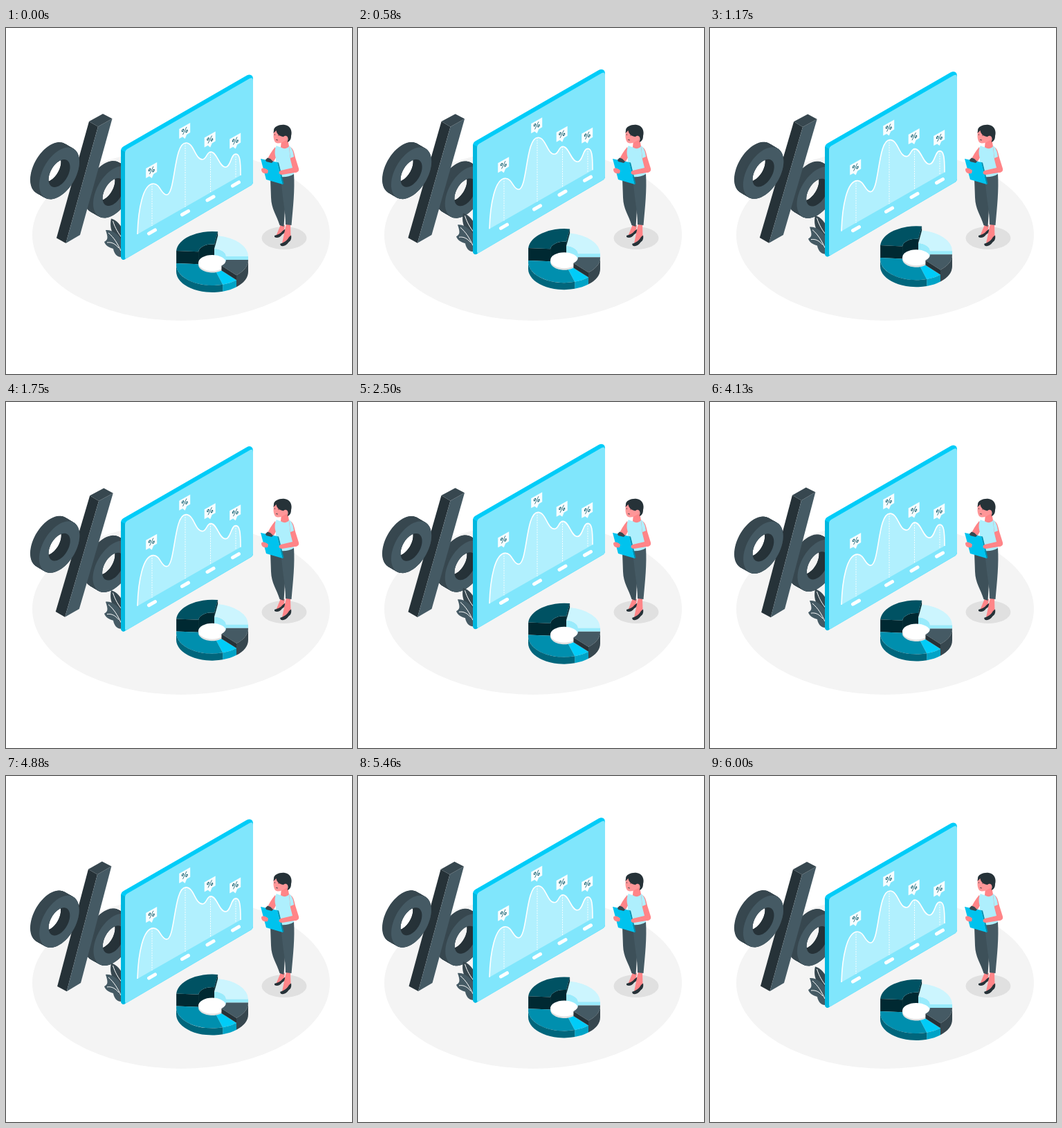
These frames come from a looping animation (500 px wide and 500 px high, 6040 ms). An HTML page:

```html
<!DOCTYPE html>
<html lang="en">
<head>
<meta charset="utf-8">
<title>Percent dashboard</title>
<style>
  html, body { margin: 0; width: 100%; height: 100%; overflow: hidden; background: #fff; }
  svg { display: block; width: 100vw; height: 100vh; }
  text { font: 600 11px Inter, "Open Sans", sans-serif; fill: #005263; text-anchor: middle; }
</style>
</head>
<body>
<svg viewBox="0 0 500 500">
  <ellipse cx="253" cy="299" rx="215" ry="124" fill="#f4f4f4"/>
  <ellipse cx="402" cy="303.5" rx="32.5" ry="16.5" fill="#e0e0e0"/>

  <g id="percent">
    <g id="ringRight"></g>
    <path d="M120 135L133 142.5L86.5 311L73 303.500Z" fill="#263238"/>
    <path d="M133 142.500L153.500 131L107 299L86.500 311Z" fill="#455a64"/>
    <path d="M120 135L140 124L153.500 131L133 142.500Z" fill="#37474f"/>
    <g id="ringLeft"></g>
  </g>

  <g id="panel">
    <g id="plant">
      <path d="M170 314C153 303 149 288 152 275.500C160 277 167 286 170 295Z" fill="#37474f"/>
      <path d="M168 331C160 332 156 325 155 319C149 317 144 315 142 309C147 306 148 304 144 292C153 291 164 298 170 312Z" fill="#455a64"/>
      <path d="M154.500 279C158 290 162 296 168 304M148 296C156 303 161 311 166 322M146 310C153 309 158 312 163 318" fill="none" stroke="#fff" stroke-width="1"/>
    </g>
    <path d="M166 178Q166 173 170 171L348 68.500Q353 66 356 69.500Q357 71 357 75V222Q357 226 353 228L173 333.500Q169 336 167 333.500Q166 332 166 330Z" fill="#00ccf8"/>
    <path d="M166 176L172 179V334Q169 336 167 333.500Q166 332 166 330Z" fill="#00b8df"/>
    <path d="M172 181Q172 177 175 175L352 73Q357 70.500 357 76V222Q357 226 353 228L175 332.500Q172 334 172 331Z" fill="#80e6fc"/>
    <path id="area" fill="#fff" fill-opacity=".38"/>
    <path id="curve" fill="none" stroke="#fff" stroke-width="1.600"/>
    <g id="marks"></g>
  </g>

  <g id="pie"></g>

  <g id="woman">
    <path d="M397 284L403 285L401.500 293L394 299L390 301Z" fill="#ff8588"/>
    <path d="M388 300C392 299 397 297 400 293L403.500 290.500C404.500 294 402 297 399 298.500C396 303 391 304 388 302Z" fill="#263238"/>
    <path d="M405 283H411L411.500 302L403 309L399 311Z" fill="#ff8588"/>
    <path d="M396 312C401 310 406 308 409 302L412 299.500C413 305 411 308 408.500 309.500C405 315 400 316 397 314.500Z" fill="#263238"/>
    <path d="M382 217L400 214L405 245L403 262L401.500 287L395.500 285C391 270 383.500 262 383 245Z" fill="#3d5059"/>
    <path d="M396 214L416 210C417.500 235 415 257 412.500 285L404 284C404 265 400 250 398 225Z" fill="#455a64"/>
    <path d="M389 172C384 178 380 184 377 192L385 196L393 182Z" fill="#ff8588"/>
    <path d="M391 170C396 173 403 173 409 170C412 173 414 176 414.500 183C415 193 416 204 416 211C410 215 402 216 396 215C390 207 390 196 390 188C388 182 388 175 391 170Z" fill="#aeeffd"/>
    <path d="M398 162L407 160L409 171C406 175 400 175 397 172Z" fill="#ff8588"/>
    <path d="M387.500 148C386 153 386 161 389 165C393 168 399 166 403 163C408 162 409 158 407 155L401 147Z" fill="#ff9698"/>
    <path d="M387 148C387 142 396 139 403 140C411 141 414 149 412 156C412 161 410 164 406.500 165C408 161 408 157 405 156C402 155 401 158 400 157C394 156 391 152 390.500 148L386.500 152Z" fill="#263238"/>
    <path d="M388.500 153.500V155M394 154.500V156M390 161.500L393 162" stroke="#263238" stroke-width=".8"/>
    <path d="M368 189L392 194L400 226L376 219Z" fill="#00c3ee"/>
    <path d="M392 194L394 194.500L401.500 225L400 226Z" fill="#008fae"/>
    <path d="M375 190.500L378 187.500L382 189L386 193L384 195L376 193Z" fill="#37474f"/>
    <path d="M369 204C371 201 376 203 379 206L378 210C374 211 369 210 369 204Z" fill="#ff8588"/>
    <path d="M409 172C415 172 416 179 418 187L423 203C424 207 421 209 417 209L399 212C394 212 393 208 397 206L414 202L411 190Z" fill="#ff8588"/>
    <path d="M409 170C413 173 415 178 416 186L411 188Z" fill="#aeeffd"/>
  </g>
</svg>

<script>
const LOOP = 6040, ACTIVE = 6000;
const $ = id => document.getElementById(id);
const path = (d, fill) => `<path d="${d}" fill="${fill}"/>`;

// Big percent rings: circles on a vertical isometric plane, extruded up-left
function isoCircle(cx, cy, a) {
  let d = '';
  for (let i = 0; i < 60; i++) {
    const w = i / 60 * 2 * Math.PI, u = a * Math.cos(w);
    d += `${i ? 'L' : 'M'}${(cx + u).toFixed(2)} ${(cy - .577 * u + 1.155 * a * Math.sin(w)).toFixed(2)}`;
  }
  return d + 'Z';
}

function ring(id, cx, cy) {
  const R = 29, r = 15.5, dx = -13, dy = -7.5;
  let side = '';
  for (let i = 0; i <= 26; i++) {
    const k = i / 26, x = cx + dx * k, y = cy + dy * k;
    side += `<path d="${isoCircle(x, y, R)}${isoCircle(x, y, r)}" fill-rule="evenodd"/>`;
  }
  const clip = id + 'Hole';
  $(id).innerHTML = `<clipPath id="${clip}"><path d="${isoCircle(cx, cy, r)}"/></clipPath>
    <g fill="#37474f">${side}</g>
    <g fill="#263238" clip-path="url(#${clip})">${side}</g>
    <path d="${isoCircle(cx, cy, R)}${isoCircle(cx, cy, r)}" fill="#455a64" fill-rule="evenodd"/>`;
}
ring('ringLeft', 77, 210);
ring('ringRight', 155, 237);

// Chart
const curve = 'M190 298C191 262 198 225 213 225C223 225 224 241 232 241C245 241 242 166 260 166' +
  'C272 166 273 190 284 190C290 190 290 179 296 179C305 179 308 201 317 201C325 201 325 182 332 182C338 182 339 192 339 213';
$('curve').setAttribute('d', curve);
$('area').setAttribute('d', curve + 'Z');

const mark = ([x, top, tagY]) => {
  const base = 298 - .57 * (x - 190), pill = base + 8.5;
  return `<path d="M${x} ${top}V${base}" stroke="#fff" stroke-width=".9" stroke-dasharray="2 1.500"/>
    <path d="M${x - 4.5} ${pill + 2.600}L${x + 4.5} ${pill - 2.600}" stroke="#fff" stroke-width="5" stroke-linecap="round"/>
    <g transform="translate(${x - .8} ${tagY})">
      <path d="M-8-2.500L8-11.500V2.500L3 5.400L.5 11.500L-3 8.800L-8 11.500Z" fill="#f7fdff"/>
      <text transform="skewY(-30)" y="4">%</text>
    </g>`;
};
$('marks').innerHTML = [[211, 225, 205.5], [259, 166, 148.5], [295.5, 179, 161], [332, 182, 163]].map(mark).join('');

// Pie: each slice has its own top level over a shared base
const CX = 298, OUT = [52, 30], INN = [20, 11.5], BASE = 352;
const at = (deg, [rx, ry], cy) => {
  const w = deg * Math.PI / 180;
  return `${(CX + rx * Math.cos(w)).toFixed(2)} ${(cy + ry * Math.sin(w)).toFixed(2)}`;
};
const arc = (to, radii, cy, sweep) => `A${radii} 0 0 ${sweep} ${at(to, radii, cy)}`;
const sliceTop = (a, b, cy, fill) => path(
  `M${at(a, OUT, cy)}${arc(b, OUT, cy, 1)}L${at(b, INN, cy)}${arc(a, INN, cy, 0)}Z`, fill);
const band = (a, b, radii, top, bottom, fill) => path(
  `M${at(a, radii, top)}${arc(b, radii, top, 1)}L${at(b, radii, bottom)}${arc(a, radii, bottom, 0)}Z`, fill);
const cut = (deg, top, bottom, fill) => path(
  `M${at(deg, OUT, top)}L${at(deg, INN, top)}L${at(deg, INN, bottom)}L${at(deg, OUT, bottom)}Z`, fill);

$('pie').innerHTML = [
  band(184, 279, INN, 324, 344, '#002932'),
  band(279, 360, INN, 330, 344, '#99ebfc'),
  sliceTop(184, 279, 324, '#005263'),
  sliceTop(279, 360, 330, '#ccf5fe'),
  cut(279, 324, 330, '#002932'),
  cut(184, 324, 342, '#002932'),
  cut(360, 330, 335, '#99ebfc'),
  `<ellipse cx="${CX}" cy="343" rx="20" ry="11.500" fill="#e0e0e0"/>`,
  `<ellipse cx="${CX}" cy="339.500" rx="20" ry="11.500" fill="#fff"/>`,
  sliceTop(0, 47.7, 335, '#455a64'),
  band(0, 47.7, OUT, 335, BASE, '#37474f'),
  sliceTop(47.7, 73, 342, '#00ccf8'),
  band(47.7, 73, OUT, 342, BASE, '#00a3c6'),
  cut(47.7, 335, 342, '#263238'),
  sliceTop(73, 184, 342, '#008fae'),
  band(73, 180, OUT, 342, BASE, '#00667c')
].join('');

// Motion
const bob = (t, period) => -10 * (1 - Math.abs(1 - 2 * (t % period) / period));
const sway = t => {
  const p = t / ACTIVE;
  return p < .25 ? 4 * p : p < .75 ? 2 - 4 * p : 4 * p - 4;
};

function draw(ms) {
  const t = Math.min(ms % LOOP, ACTIVE);
  $('panel').setAttribute('transform', `translate(0 ${bob(t, 1500)})`);
  $('pie').setAttribute('transform', `translate(0 ${bob(t, 3000)})`);
  $('percent').setAttribute('transform', `rotate(${sway(t)} 105 217)`);
}

const start = performance.now();
function tick() {
  draw(performance.now() - start);
  requestAnimationFrame(tick);
}
draw(0);
requestAnimationFrame(tick);
</script>
</body>
</html>
```
